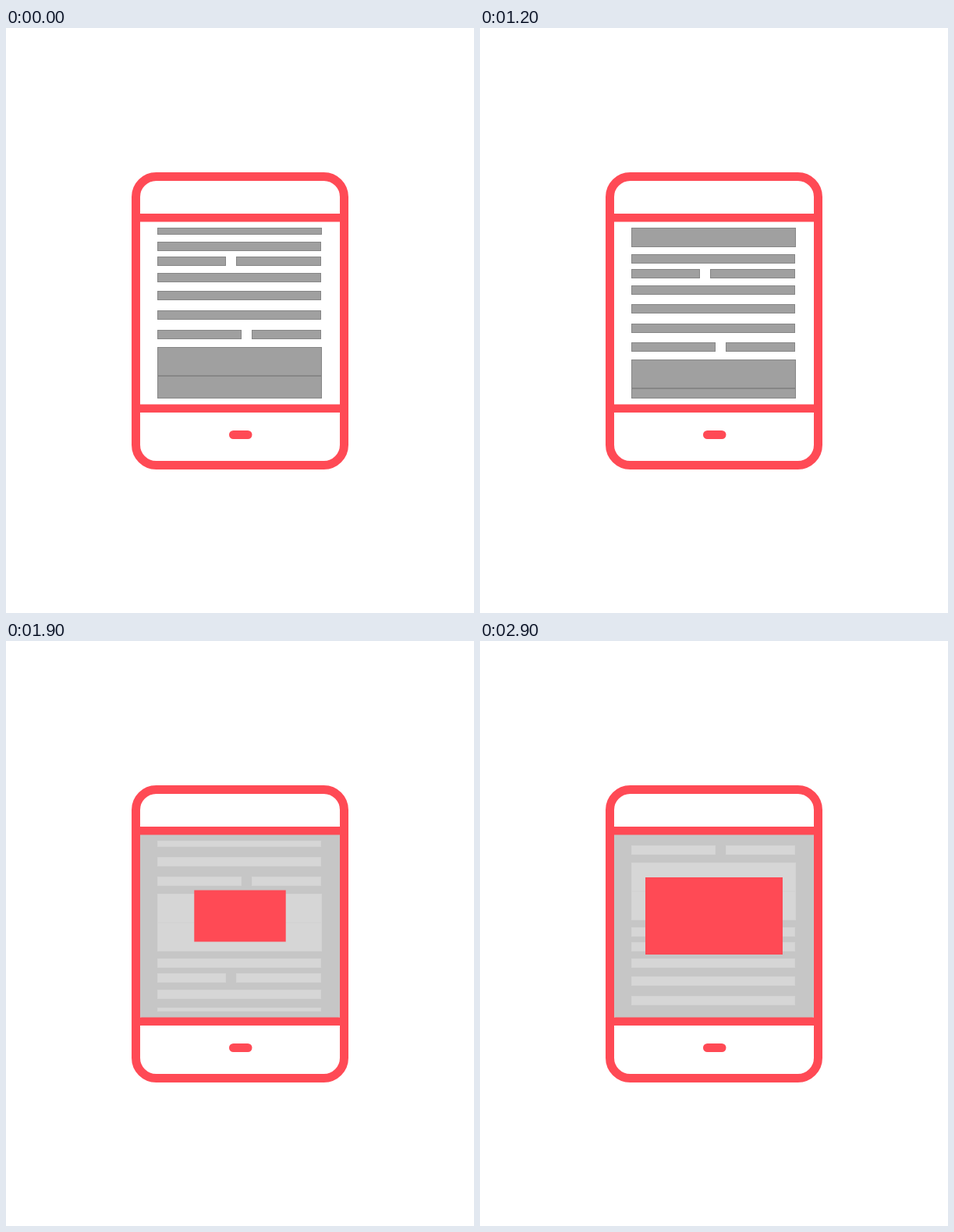
An HTML page with a canvas for the animation above (5000 ms loop, 600x750 px).

```html
<!DOCTYPE html>
<html lang="en">
<head>
<meta charset="utf-8">
<title>Tablet pop-up</title>
<style>
  html, body { margin: 0; width: 100%; height: 100%; overflow: hidden; background: #fff; }
  canvas { display: block; width: 600px; height: 750px; }
</style>
</head>
<body>
<canvas id="stage" width="600" height="750"></canvas>
<script>
const ctx = document.getElementById('stage').getContext('2d');
const LOOP = 5000, STEP = 100;
const RED = '#ff4a55';
const VIEW = { top: 256, bottom: 475 };
const PERIOD = 218, SCROLL = 343;

// One page of text: [offset, height, left, right]
const rows = [
  [0, 12, 194, 404],
  [19, 12, 194, 282], [19, 12, 295, 404],
  [40, 12, 194, 404],
  [63.4, 12, 194, 404],
  [88.4, 12, 194, 404],
  [113, 12, 194, 302], [113, 12, 315, 404],
  [135, 37, 194, 405], [172, 37, 194, 405]
];

const clamp = x => Math.min(1, Math.max(0, x));

function scrollEase(x) {
  let lo = 0, hi = 1, s = 0.5;
  for (let i = 0; i < 24; i++) {
    s = (lo + hi) / 2;
    const r = 1 - s;
    const px = 3 * 0.303 * s * r * r + 3 * 0.34 * s * s * r + s * s * s;
    if (px < x) lo = s; else hi = s;
  }
  return s * s * (3 - 2 * s);
}

function backOut(x, c = 1.4) {
  const u = x - 1;
  return 1 + (c + 1) * u ** 3 + c * u * u;
}

function box(x, y, w, h, r, fill) {
  ctx.beginPath();
  ctx.roundRect(x, y, w, h, r);
  ctx.fillStyle = fill;
  ctx.fill();
}

function drawText(scroll, fill, edge) {
  ctx.lineWidth = 1;
  ctx.strokeStyle = edge;
  for (let page = -1; page < 3; page++) {
    for (const [dy, h, left, right] of rows) {
      const y = Math.round(274 + page * PERIOD + dy - scroll);
      const top = Math.max(y, VIEW.top), bottom = Math.min(y + h, VIEW.bottom);
      if (bottom <= top) continue;
      box(left, top, right - left, bottom - top, 1, fill);
      if (bottom - top > 1) {
        ctx.strokeRect(left + 0.5, top + 0.5, right - left - 1, bottom - top - 1);
      }
    }
  }
}

// Soft grey band running inwards from an edge
function shade(x0, y0, x1, y1, x, y, w, h) {
  const g = ctx.createLinearGradient(x0, y0, x1, y1);
  g.addColorStop(0, 'rgba(150,150,150,1)');
  g.addColorStop(1, 'rgba(150,150,150,0)');
  ctx.fillStyle = g;
  ctx.fillRect(x, y, w, h);
}

function drawDim(k, scroll) {
  const w = 257 * k, h = 236 * k, x = 300 - w / 2, y = 365 - h / 2;
  ctx.save();
  ctx.beginPath();
  ctx.roundRect(x, y, w, h, 3);
  ctx.clip();
  ctx.fillStyle = '#c6c6c6';
  ctx.fillRect(x, y, w, h);
  drawText(scroll, '#d6d6d6', '#d3d3d3');
  if (k < 1) {
    shade(x - 2, 0, x + 12, 0, x, y, 14, h);
    shade(x + w + 2, 0, x + w - 12, 0, x + w - 14, y, 14, h);
    shade(0, y, 0, y + 4, x, y, w, 4);
    shade(0, y + h, 0, y + h - 3, x, y + h - 3, w, 3);
  }
  ctx.restore();
}

function drawTablet() {
  ctx.strokeStyle = RED;
  ctx.lineWidth = 11;
  ctx.beginPath();
  ctx.roundRect(166.5, 190.5, 267, 370, 26);
  ctx.stroke();
  ctx.fillStyle = RED;
  ctx.fillRect(162, 238, 277, 10.5);
  ctx.fillRect(162, 482.5, 277, 10.5);
  box(286, 516, 29.5, 11, 5.5, RED);
}

function draw(t) {
  const scroll = SCROLL * scrollEase(clamp(t / 2900));
  const dim = clamp((t - 1612) / 188);
  const pop = backOut(clamp((t - 1800) / 500));

  ctx.fillStyle = '#fff';
  ctx.fillRect(0, 0, 600, 750);
  if (dim < 1) drawText(scroll, '#a0a0a0', '#868686');
  if (dim > 0) drawDim(dim, scroll);
  if (pop > 0) {
    const w = 176 * pop, h = 99 * pop;
    ctx.fillStyle = RED;
    ctx.fillRect(300 - w / 2, 352.5 - h / 2, w, h);
  }
  drawTablet();
}

const start = performance.now();
function tick() {
  const t = (performance.now() - start) % LOOP;
  draw(Math.floor(t / STEP) * STEP);
  requestAnimationFrame(tick);
}
tick();
</script>
</body>
</html>
```
